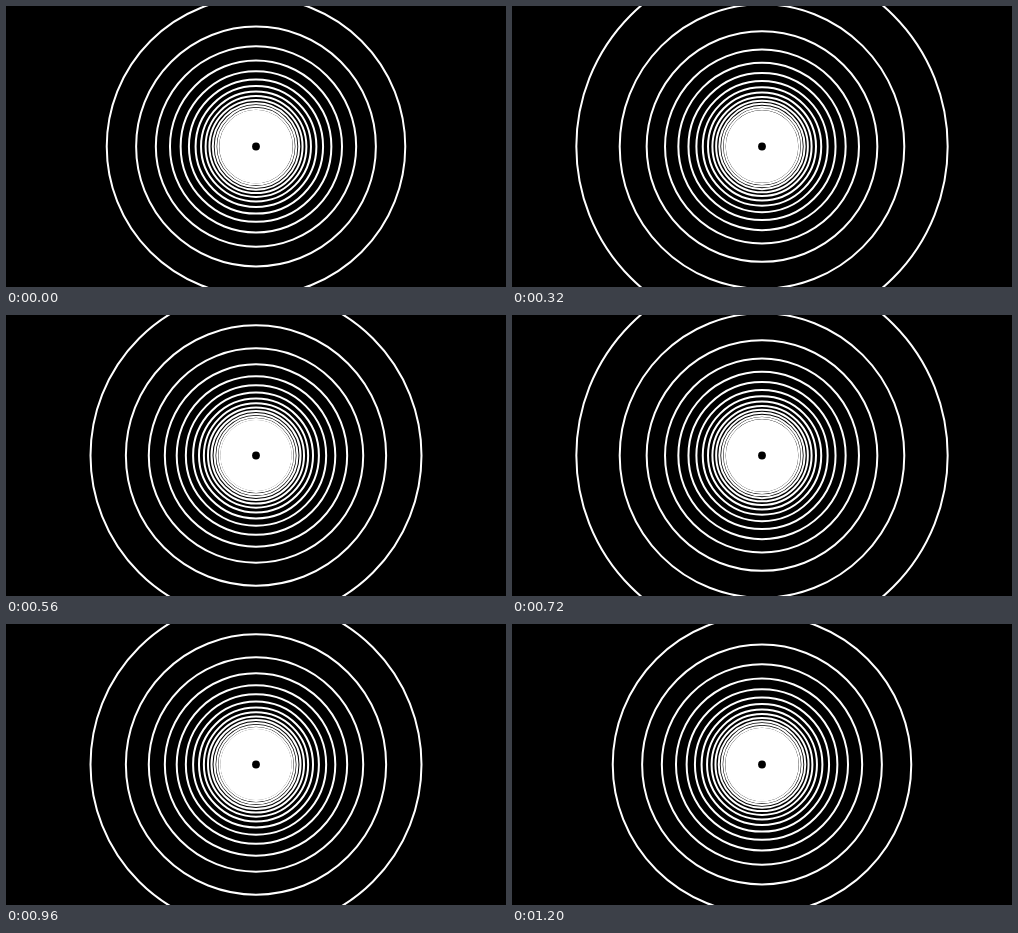
These frames come from a looping animation (500x281 px, 1.22 s). An HTML page with a canvas:

```html
<!DOCTYPE html>
<html lang="en">
<head>
<meta charset="utf-8">
<title>Ring tunnel</title>
<style>
  html, body { margin: 0; width: 100%; height: 100%; overflow: hidden; background: #000; }
  canvas { display: block; }
</style>
</head>
<body>
<canvas id="stage" width="500" height="281"></canvas>
<script>
const ctx = document.getElementById('stage').getContext('2d');
const CX = 250, CY = 140.5;
const LOOP = 1220, STEP = 20, CYCLE = 400;
const FIRST_RING = 4, LAST_RING = 24;

// Perspective: evenly spaced rings, radius inversely proportional to depth.
const ringRadius = depth => 609 / (depth + 0.08);

function disc(radius, color) {
  ctx.fillStyle = color;
  ctx.beginPath();
  ctx.arc(CX, CY, radius, 0, Math.PI * 2);
  ctx.fill();
}

function draw(ms) {
  const time = Math.floor((ms % LOOP) / STEP) * STEP;
  const phase = (time % CYCLE) / CYCLE;

  ctx.fillStyle = '#000';
  ctx.fillRect(0, 0, 500, 281);

  ctx.strokeStyle = '#fff';
  ctx.lineWidth = 2;
  for (let n = FIRST_RING; n <= LAST_RING; n++) {
    ctx.beginPath();
    ctx.arc(CX, CY, ringRadius(n - phase), 0, Math.PI * 2);
    ctx.stroke();
  }

  disc(35.5, '#fff');
  disc(3.9, '#000');
}

function tick() {
  draw(performance.now());
  requestAnimationFrame(tick);
}
tick();
</script>
</body>
</html>
```
